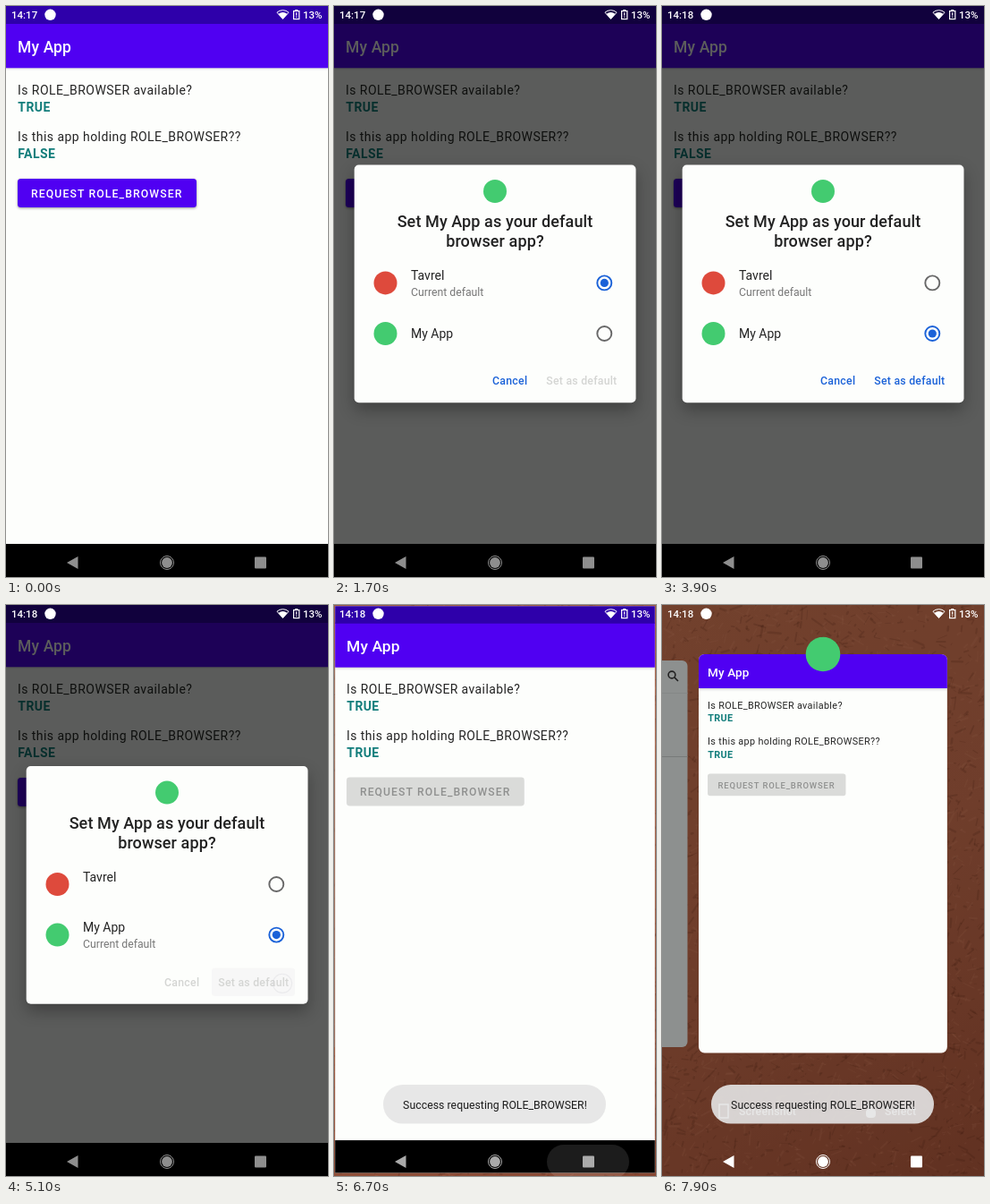
Write an HTML page with a canvas that moves like this. It is 360 by 638 pixels and loops after 8000 ms.

```html
<!DOCTYPE html>
<html lang="en">
<head>
<meta charset="utf-8">
<title>Default browser role</title>
<style>
html, body { margin: 0; width: 100%; height: 100%; overflow: hidden; background: #000; }
canvas { display: block; width: 360px; height: 638px; }
</style>
</head>
<body>
<canvas id="stage"></canvas>
<script>
const W = 360, H = 638, LOOP = 8000, STEP = 100, TAU = Math.PI * 2;
const PURPLE = '#5000f2', PAPER = '#fdfefc', BLUE = '#1b62d8', GREEN = '#43cb70', RED = '#de4a3c';
const canvas = document.getElementById('stage');
const dpr = window.devicePixelRatio || 1;
canvas.width = W * dpr;
canvas.height = H * dpr;
const c = canvas.getContext('2d');

const clamp = v => Math.max(0, Math.min(1, v));
const ramp = (t, from, to) => clamp((t - from) / (to - from));
const smooth = u => u * u * (3 - 2 * u);
const mix = (a, b, u) => a + (b - a) * u;

function text(str, x, y, size, color, weight = 400, spacing = 0, align = 'left') {
  c.font = `${weight} ${size}px Roboto, sans-serif`;
  c.letterSpacing = spacing + 'px';
  c.textAlign = align;
  c.fillStyle = color;
  c.fillText(str, x, y);
}

function rect(x, y, w, h, color) {
  c.fillStyle = color;
  c.fillRect(x, y, w, h);
}

function round(x, y, w, h, r, color) {
  c.beginPath();
  c.roundRect(x, y, w, h, r);
  c.fillStyle = color;
  c.fill();
}

function disc(x, y, r, color) {
  c.beginPath();
  c.arc(x, y, r, 0, TAU);
  c.fillStyle = color;
  c.fill();
}

function ring(x, y, r, width, color) {
  c.beginPath();
  c.arc(x, y, r, 0, TAU);
  c.lineWidth = width;
  c.strokeStyle = color;
  c.stroke();
}

function layer(alpha, draw) {
  if (alpha <= 0) return;
  c.save();
  c.globalAlpha *= alpha;
  draw();
  c.restore();
}

function shadow(blur, y, alpha) {
  c.shadowColor = `rgba(0,0,0,${alpha})`;
  c.shadowBlur = blur * dpr;
  c.shadowOffsetY = y * dpr;
}

function noShadow() {
  c.shadowColor = 'transparent';
}

// Ripple that grows from a point inside a clipped box
function ripple(x, y, w, h, r, cx, cy, radius, color) {
  c.save();
  c.beginPath();
  c.roundRect(x, y, w, h, r);
  c.clip();
  disc(cx, cy, radius, color);
  c.restore();
}

function touch(x, y, alpha) {
  layer(alpha, () => {
    disc(x, y, 10.6, 'rgba(255,255,255,.5)');
    ring(x, y, 10.6, 1.1, 'rgba(90,90,115,.55)');
  });
}

function fan(x, y, r) {
  const a = Math.PI / 4.3;
  c.beginPath();
  c.moveTo(x, y);
  c.arc(x, y, r, -Math.PI / 2 - a, -Math.PI / 2 + a);
  c.closePath();
}

function statusIcons(t) {
  text(t < 3800 ? '14:17' : '14:18', 6, 14, 11.5, '#fff', 500);
  disc(49.5, 9.8, 6.2, '#fff');
  fan(309.5, 14.5, 9.8);
  c.lineWidth = 1;
  c.strokeStyle = '#fff';
  c.stroke();
  fan(309.5, 14.5, 7.4);
  c.fillStyle = '#fff';
  c.fill();
  rect(323.2, 4, 3, 2, '#fff');
  c.lineWidth = 1.2;
  c.strokeStyle = '#fff';
  c.strokeRect(321.6, 5.6, 6.2, 9);
  rect(324.1, 7.4, 1.2, 3.2, '#fff');
  rect(324.1, 11.6, 1.2, 1.2, '#fff');
  text('13%', 332, 14, 11.5, '#fff', 500);
}

function navIcons(color) {
  c.fillStyle = color;
  c.beginPath();
  c.moveTo(68, 622);
  c.lineTo(80.5, 615);
  c.lineTo(80.5, 629);
  c.fill();
  disc(180, 622, 5.9, color);
  ring(180, 622, 7.5, 1, color);
  round(278, 615.5, 13, 13, 1, color);
}

function app(t) {
  const held = t >= 5200;
  rect(0, 0, W, H, PAPER);
  c.save();
  shadow(3, 1, .22);
  rect(0, 19, W, 50.3, PURPLE);
  c.restore();
  rect(0, 0, W, 20, '#2e00aa');
  text('My App', 13, 52, 17.5, '#fff', 500, .15);

  const line = (s, y) => text(s, 13, y, 14, '#242424', 400, .44);
  const value = (s, y) => text(s, 13.3, y, 14, '#127d7b', 700, .44);
  line('Is ROLE_BROWSER available?', 98.7);
  value('TRUE', 117.8);
  line('Is this app holding ROLE_BROWSER??', 150.8);
  value(held ? 'TRUE' : 'FALSE', 169.8);

  c.save();
  if (!held) shadow(3, 1, .4);
  round(13, 193, 200, 32, 3.5, held ? '#dadbd9' : PURPLE);
  c.restore();
  if (t >= 500 && t < 1100) {
    layer(1 - ramp(t, 800, 1100), () =>
      ripple(13, 193, 200, 32, 3.5, 113, 209, mix(25, 105, ramp(t, 500, 800)), 'rgba(255,255,255,.24)'));
  }
  text('REQUEST ROLE_BROWSER', 28, 214, 12.25, held ? '#8f908f' : '#fff', 500, 1.09);
  if (t >= 500 && t < 900) touch(130, 212, 1);
  rect(0, 601, W, 37, '#000');
}

function radio(y, on) {
  ring(302.3, y, 8, 1.9, on ? BLUE : '#686868');
  if (on) disc(302.3, y, 4.6, BLUE);
}

function dialog(t) {
  const picked = t >= 2900, busy = t >= 4800, swapped = t >= 5000;
  c.save();
  if (swapped) c.translate(0, 2.6);
  shadow(18, 8, .3);
  round(22.7, 177.5, 314.8, 265.7, 5, PAPER);
  noShadow();

  disc(180, 207, 13, GREEN);
  text('Set My App as your default', 180, 247, 18, '#222', 500, .1, 'center');
  text('browser app?', 180, 269, 18, '#222', 500, .1, 'center');

  if (t >= 2600 && t < 3200) {
    layer(1 - ramp(t, 2800, 3200), () =>
      ripple(23, 337.5, 314.5, 56.5, 0, mix(300, 180, ramp(t, 2550, 2780)), 366,
        mix(20, 130, ramp(t, 2550, 2800)) + ramp(t, 2800, 2900) * 40, '#dcdddb'));
  }

  disc(57.5, 309.4, 13, RED);
  text('Tavrel', 86, 306.2, 14, '#242424');
  radio(309.4, !picked);
  disc(57.5, 366, 13, GREEN);
  text('My App', 86, swapped ? 362.6 : 371, 14, '#242424');
  radio(366, picked);
  text('Current default', 86, swapped ? 380.2 : 324, 12.25, '#777');

  if (t >= 4500) {
    layer(t < 4800 ? 1 : .7, () =>
      ripple(230, 403, 93, 31.5, 3.5, 276, 419, mix(20, 60, ramp(t, 4500, 4700)), t < 4800 ? '#e3ebf8' : '#f5f6f5'));
  }
  text('Cancel', 177, 423.4, 12.25, busy ? '#d4d5d3' : BLUE, 500, .3);
  text('Set as default', 237.3, 423.4, 12.25, picked && !busy ? BLUE : '#d4d5d3', 500, .25);

  if (t >= 2600 && t < 2900) touch(307, 366, 1);
  if (t >= 4500) touch(309, 420.2, t < 4800 ? 1 : .14);
  c.restore();
}

function toast(t) {
  layer(mix(.5, 1, ramp(t, 5300, 5600)), () => {
    round(55, 536, 249, 43.6, 21.8, 'rgba(229,229,229,.9)');
    text('Success requesting ROLE_BROWSER!', 180, 563, 12.25, '#1c1c1c', 400, .05, 'center');
  });
}

// Rust coloured wallpaper: a soft gradient with seeded grain
const wall = (() => {
  const cv = document.createElement('canvas');
  cv.width = W;
  cv.height = H;
  const g = cv.getContext('2d');
  let seed = 7;
  const rnd = () => (seed = seed * 16807 % 2147483647) / 2147483647;
  const base = g.createLinearGradient(0, 0, W, H);
  base.addColorStop(0, '#a05f44');
  base.addColorStop(.5, '#9c5a41');
  base.addColorStop(1, '#874732');
  g.fillStyle = base;
  g.fillRect(0, 0, W, H);
  g.lineCap = 'round';
  for (let i = 0; i < 3500; i++) {
    const x = rnd() * W, y = rnd() * H, len = 1 + rnd() * rnd() * 16;
    const angle = rnd() * 2.4 - 1.6;
    g.strokeStyle = rnd() < .55 ? 'rgba(60,24,14,.17)' : 'rgba(205,145,112,.14)';
    g.lineWidth = .6 + rnd() * 2;
    g.beginPath();
    g.moveTo(x, y);
    g.lineTo(x + len * Math.cos(angle), y + len * Math.sin(angle));
    g.stroke();
  }
  return cv;
})();

function sideCard(t) {
  layer(mix(.3, 1, ramp(t, 6900, 7300)), () => {
    round(-30, 62, 58.5, 432, 6, '#8d908f');
    rect(0, 98, 28.5, 1, '#858887');
    rect(0, 169, 28.5, 1, '#777a79');
  });
  layer(mix(.7, 1, ramp(t, 6900, 7300)), () => {
    ring(11, 78, 3.9, 1.6, '#222');
    c.beginPath();
    c.moveTo(13.9, 80.9);
    c.lineTo(18, 85);
    c.stroke();
  });
}

function actions() {
  c.lineWidth = 1.5;
  c.strokeStyle = '#fff';
  c.strokeRect(64, 558, 10, 15);
  text('Screenshot', 86, 569.5, 12.25, '#fff', 500, .2);
  round(228, 563, 11, 10, 4, '#fff');
  round(231, 557, 3, 9, 1.5, '#fff');
  text('Select', 249, 569.5, 12.25, '#fff', 500, .2);
}

function recents(t) {
  const p = smooth(ramp(t, 6650, 7157));
  c.drawImage(wall, 0, 0, W, H);
  rect(0, 0, W, H, `rgba(25,6,0,${.34 * ramp(t, 6900, 7300)})`);
  sideCard(t);

  const k = mix(1, .772, p), top = 20 * p, bottom = mix(H, 597, Math.pow(p, 1.36));
  c.save();
  c.translate(41 * p, 39.5 * Math.pow(p, 1.08));
  c.scale(k, k);
  c.beginPath();
  c.roundRect(0, top, W, bottom - top, 8.5 * p * p);
  c.clip();
  app(t);
  c.restore();

  layer(ramp(t, 7100, 7400), () => {
    disc(180, 55, 19.3, GREEN);
    actions();
  });
  layer(1 - ramp(t, 6900, 7200), () => round(238, 603, 92, 38, 19, 'rgba(255,255,255,.11)'));
}

function draw(t) {
  c.setTransform(dpr, 0, 0, dpr, 0, 0);
  if (t >= 6700) {
    recents(t);
  } else {
    app(t);
    if (t >= 1100 && t < 5300) {
      const dim = t < 5200 ? .64 * ramp(t, 1050, 1295) : .22;
      rect(0, 0, W, 601, `rgba(0,2,0,${dim})`);
      const alpha = t < 1300 ? (t < 1200 ? .4 : .93) : t < 5200 ? 1 : .3;
      layer(alpha, () => dialog(t));
      rect(0, 601, W, 37, '#000');
    }
  }
  if (t >= 5300) toast(t);
  statusIcons(t);
  const lit = Math.round(mix(142, 255, ramp(t, 6600, 7000)));
  navIcons(`rgb(${lit},${lit},${lit})`);
}

const start = performance.now();
function tick() {
  const t = (performance.now() - start) % LOOP;
  draw(Math.floor(t / STEP) * STEP);
  requestAnimationFrame(tick);
}
tick();
</script>
</body>
</html>
```
